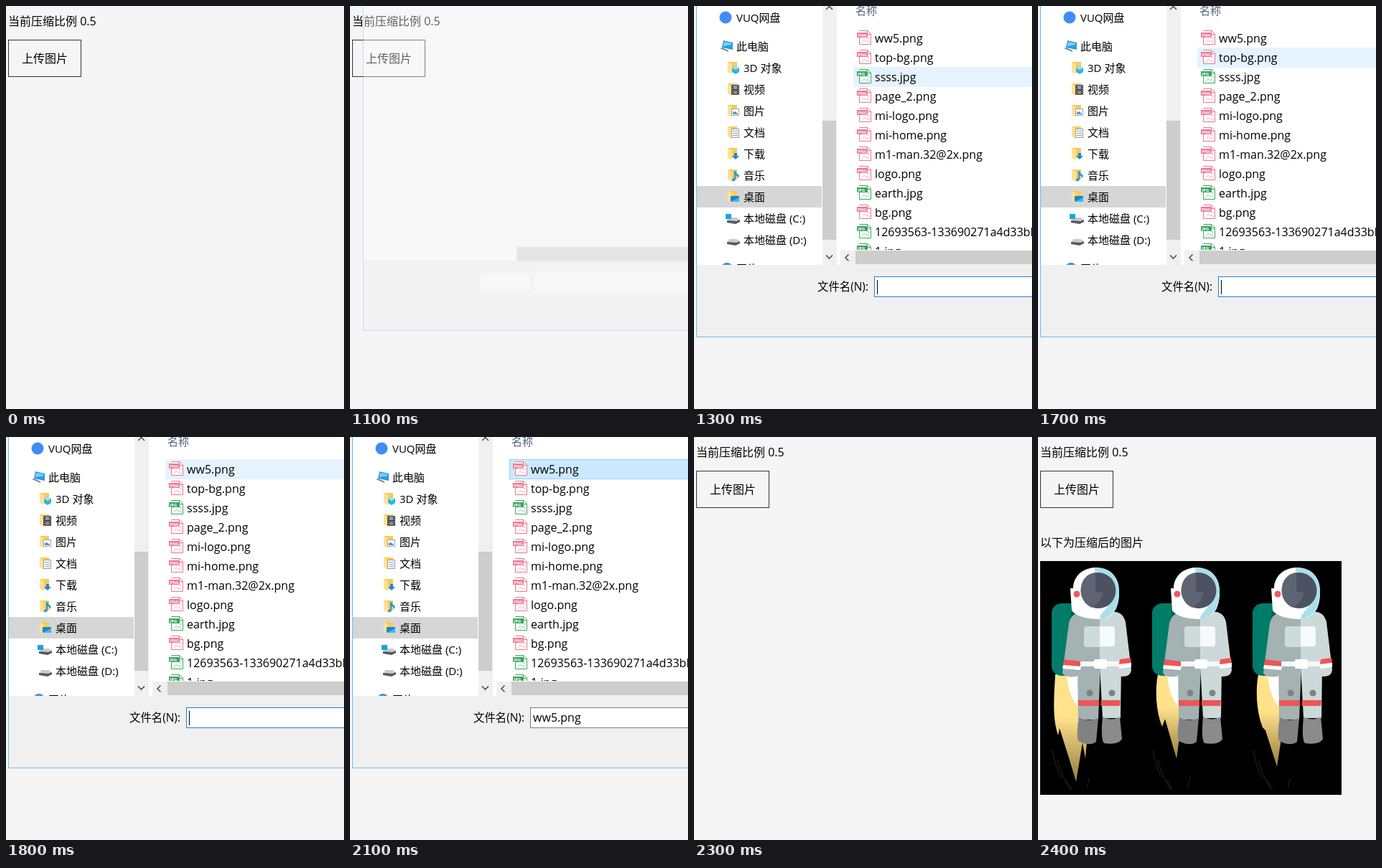
An HTML page for the animation above (3200 ms loop, 471 by 562 pixels).

```html
<!DOCTYPE html>
<html lang="zh-CN">
<head>
<meta charset="utf-8">
<style>
html, body { margin: 0; width: 100%; height: 100%; overflow: hidden; background: #f5f5f5; }
svg { display: block; font-family: "Open Sans", "Noto Sans CJK SC", "Noto Sans CJK", sans-serif; }
</style>
</head>
<body>
<svg id="stage" width="471" height="562" viewBox="0 0 471 562"></svg>
<script>
const stage = document.getElementById('stage');
const text = (x, y, s, size = 16, fill = '#000') =>
  `<text x="${x}" y="${y}" font-size="${size}" fill="${fill}">${s}</text>`;
const rect = (x, y, w, h, fill, extra = '') =>
  `<rect x="${x}" y="${y}" width="${w}" height="${h}" fill="${fill}" ${extra}/>`;
const path = (d, fill, extra = '') => `<path d="${d}" fill="${fill}" ${extra}/>`;
const line = (d, color, width = 1, extra = '') =>
  path(d, 'none', `stroke="${color}" stroke-width="${width}" ${extra}`);
const circle = (x, y, r, fill) => `<circle cx="${x}" cy="${y}" r="${r}" fill="${fill}"/>`;
const group = (id, body) => `<g id="${id}">${body}</g>`;

// Sidebar, icons relative to the row centre
const folder = badge => rect(47, -8, 13, 14, '#f5cb58') +
  path('M47-8l6 3V9l-6-3z', '#ffe194') + badge;
const drive = path('M49-1h11l4 4-5 3H46z', '#c9cbcd') + path('M46 3l13 1 5-2v3l-6 3-12-2z', '#55595c');
const places = [
  [16, 59, 'VUQ网盘', circle(44, 0, 8.5, '#3f8cf5')],
  [56, 59, '此电脑', path('M41-8l13 3V5L39 2z', '#2c9ce0') + path('M42-6l10 2v2L41 0z', '#7fd0f5') +
    path('M36 3l3-1 9 4v2z', '#78858e')],
  [86, 69, '3D 对象', folder(path('M57-2l6 2v6l-5 3-5-3V0z', '#35b5d5') + path('M57-2l6 2-5 3-5-3z', '#9be4f1'))],
  [116, 69, '视频', folder(rect(52, -6, 11, 14, '#454545') + rect(55, -5, 5, 5, '#7aa7c8') +
    rect(55, 2, 5, 5, '#9b8a65') + line('M53.5-5V8M61.5-5V8', '#ddd', 1, 'stroke-dasharray="1 2"'))],
  [146, 69, '图片', folder(rect(52.5, -2.5, 10, 9, '#fff', 'stroke="#a0a4a8"') + path('M54 5V2l3-1 4 3v1z', '#4a98c9'))],
  [176, 69, '文档', folder(rect(52.5, -4.5, 10, 12, '#fff', 'stroke="#999"') + line('M54-1.5h7M54 1.5h7M54 4.5h7', '#7fa2bd'))],
  [206, 69, '下载', folder(path('M56-1h4v4h3l-5 5-5-5h3z', '#2484d4'))],
  [236, 69, '音乐', folder(path('M56-6h2q1 4 5 6-1 4-2 4 0-3-3-4v6q-1 3-5 2-1-3 3-4z', '#2798df'))],
  [266, 69, '桌面', folder(rect(51, -1, 12, 8, '#1686d0') + path('M51 7l12-6v6z', '#47b5ee'))],
  [296, 69, '本地磁盘 (C:)', drive + rect(44, -6, 8, 7, '#17a6e6')],
  [326, 69, '本地磁盘 (D:)', drive],
  [366, 59, '网络', circle(46, 0, 8, '#3b92cc') + rect(38, -2, 10, 8, '#2b6d9b')],
];
const sidebar = rect(4, 251, 174, 30, '#d6d6d6') + places.map(([y, x, name, icon]) =>
  `<g transform="translate(0 ${y})">${icon}${text(x, 5.6, name, 15)}</g>`).join('');

// File list
const files = ['ww5.png', 'top-bg.png', 'ssss.jpg', 'page_2.png', 'mi-logo.png', 'mi-home.png',
  'm1-man.32@2x.png', 'logo.png', 'earth.jpg', 'bg.png', '12693563-133690271a4d33bb', '1.jpg'];
const fileRow = (name, i) => {
  const png = name.endsWith('.png');
  const [color, pale] = png ? ['#ee7590', '#f6b3c2'] : ['#3aa660', '#96d0aa'];
  return `<g transform="translate(227 ${31 + 27 * i})">` +
    path('M3.5 4V3.5H15L19.5 8V22.5H3.5V13', '#fff', `stroke="${color}"`) +
    line('M14.5 4V8.5H19', color) + rect(0, 6, 15, 7, color) +
    `<text x="1.2" y="11.8" font-size="6" font-weight="700" fill="#fff">${png ? 'PNG' : 'JPG'}</text>` +
    line('M7 20l3-4 3 3 2-2 2 3', pale) + circle(16, 14, 1, pale) +
    text(25, 20, name) + '</g>';
};

const dialogFrame = rect(3, -60, 900, 522, '#66bdeb') + rect(4, -60, 898, 421, '#fff') +
  rect(4, 361, 898, 100, '#f0f0f0');
const skeleton = rect(225, 341, 600, 20, '#cdcdcd') + rect(172, 380, 72, 22, '#fff') + rect(251, 376, 600, 31, '#fff');
const content =
  `<g clip-path="url(#sideClip)">${sidebar}</g>` +
  rect(179, -60, 20, 421, '#f0f0f0') + rect(179, 160, 19, 166, '#cdcdcd') +
  line('M184 5l4.5-4.5L193 5M184 347.5l4.5 4.5 4.5-4.5', '#505050', 1.6) +
  text(225, 12, '名称', 15, '#4c607a') +
  rect(222.5, 31.5, 600, 27, '#e5f3ff', 'id="highlight"') +
  `<g clip-path="url(#listClip)">${files.map(fileRow).join('')}</g>` +
  rect(204, 341, 600, 20, '#f0f0f0') + rect(225, 341, 600, 19, '#cdcdcd') +
  line('M215.5 346.5l-4.5 4.5 4.5 4.5', '#505050', 1.6) +
  text(172, 397, '文件名(N):', 15.4) + rect(251.5, 377.5, 600, 28, '#fff', 'id="field"') +
  rect(255, 382, 1, 20, '#000', 'id="caret"') + group('fileName', text(255, 397, 'ww5.png'));

// Astronaut, with its own flame outline
const astronaut = (dx, flame) => `<g transform="translate(${dx} 0)">` +
  path(flame, '#ffe28b') + path(flame, 'url(#smoke)') +
  line('M20 437q5 26 12 38M27 450q6 24 18 42M39 478l8 14M72 475l-4 14', '#3c321b', .8) +
  path('M40 331h18l-2 45q-13-12-16-45z', '#fff') +
  rect(19, 232, 42, 101, '#007c69', 'rx="14"') + path('M47 238l9 8-14 86h-8z', '#00634f') +
  // legs and boots
  path('M55 318h32l-3 76H56z', '#a4b2b2') + path('M86 318h30l-1 74H90z', '#ccd9d8') +
  path('M57 391q13 7 27 1l-3 33q-9 7-25-1-3-10 1-33z', '#808284') +
  path('M90 390q13 7 24 0l3 31q-5 9-25 6-5-5-2-37z', '#8b8b8b') +
  path('M56 367h29v8H56zM88 367h27l-1 8H88z', '#ed5557') +
  circle(72, 357, 4.5, '#7b8484') + circle(103, 357, 4.5, '#7b8484') +
  // torso and arms
  path('M86 244H61q-15 1-18 16l-9 69q2 7 20 5l6-15h26z', '#a4b2b2') +
  path('M86 244h23q10 2 13 14l8 67q-1 10-15 9l-4-15H86z', '#ccd9d8') +
  path('M36 310l24 3v7l-25-2zM114 310l15-2 1 7-17 2z', '#ed5557') +
  path('M35 318l25 2-1 5-25-2zM113 317l17-2v6l-17 2z', '#fff') +
  path('M59 313h54v7H59z', '#f4f8f8') + rect(78, 310, 18, 13, '#fff', 'rx="2"') +
  rect(64, 264, 43, 29, '#cddbda', 'rx="4"') + path('M86 264h17q4 0 4 4v20q0 4-4 4H86z', '#f7fafa') +
  // helmet
  path('M80 182C58 183 49 198 49 211H45l2 31q10 12 39 12 27-2 27-37C114 197 102 182 80 182z', '#fff') +
  path('M79 182q32 0 34 33 0 36-27 39l2-14q-8-25-9-58z', '#a9dfea') +
  path('M84 238q12 0 15-4l-13 16z', '#fff') +
  `<ellipse cx="84" cy="214" rx="24.5" ry="25" fill="#4c5261"/>` +
  path('M80 189C66 191 59 202 60 216q1 15 15 22l11-9 5-12-11-1z', '#5e6474') +
  circle(54, 219, 4.5, '#ee5a5e') + '</g>';
const longFlame = 'M24 331h34l3 55 7 39-2 23-4-22-9 54-10-33-13-41-2 10C19 390 23 355 24 331z';
const shortFlame = 'M27 331h30l3 65-7 52-16-55-4 11C24 382 23 352 27 331z';
const midFlame = 'M27 331h30l4 75-8 53-16-50-4-4C24 382 23 352 27 331z';
const photo = rect(3, 173, 420, 326, '#000') + astronaut(0, longFlame) +
  astronaut(140, shortFlame) + astronaut(280, midFlame);

stage.innerHTML = `<defs>
  <clipPath id="sideClip"><rect x="4" y="-60" width="174" height="421"/></clipPath>
  <clipPath id="listClip"><rect x="204" y="0" width="600" height="340"/></clipPath>
  <linearGradient id="smoke" x2="0" y2="1"><stop offset=".4" stop-color="#5c4818" stop-opacity="0"/>
  <stop offset="1" stop-color="#5c4818" stop-opacity=".65"/></linearGradient></defs>` +
  rect(0, 0, 471, 562, '#f5f5f5') + text(3, 27, '当前压缩比例 0.5') +
  rect(3.5, 47.5, 101, 51, 'none', 'stroke="#333"') + text(22, 79, '上传图片') +
  group('result', text(3, 153, '以下为压缩后的图片') + photo) +
  group('dialog', dialogFrame + group('skeleton', skeleton) + group('content', content));

const part = Object.fromEntries([...stage.querySelectorAll('[id]')].map(el => [el.id, el]));
const show = (name, on) => part[name].setAttribute('display', on ? 'inline' : 'none');
const set = (name, attrs) => Object.entries(attrs).forEach(([k, v]) => part[name].setAttribute(k, v));

function draw(t) {
  const opening = t < 1300;
  const selected = t >= 2000;
  // The window pops in and out around its own centre
  const [scale, opacity] = t < 1200 ? [.966, .38] : opening ? [.993, .88] : t < 2200 ? [1, 1] : [.966, .4];

  show('result', t >= 2400);
  show('dialog', t >= 1100 && t < 2300);
  set('dialog', { opacity, transform: `translate(444 196) scale(${scale}) translate(-444 -196)` });
  show('skeleton', opening);
  show('content', !opening);
  set('highlight', {
    y: 31.5 + 27 * (t < 1700 ? 2 : t < 1800 ? 1 : 0),
    fill: selected ? '#cce8ff' : '#e5f3ff',
    stroke: selected ? '#99d1ff' : '#e5f3ff',
  });
  // The field loses focus when the file is clicked
  set('field', { stroke: selected ? '#7a7a7a' : '#1883d7' });
  show('caret', !selected);
  show('fileName', t >= 2100);
}

function tick() {
  draw(performance.now() % 3200);
  requestAnimationFrame(tick);
}
tick();
</script>
</body>
</html>
```
